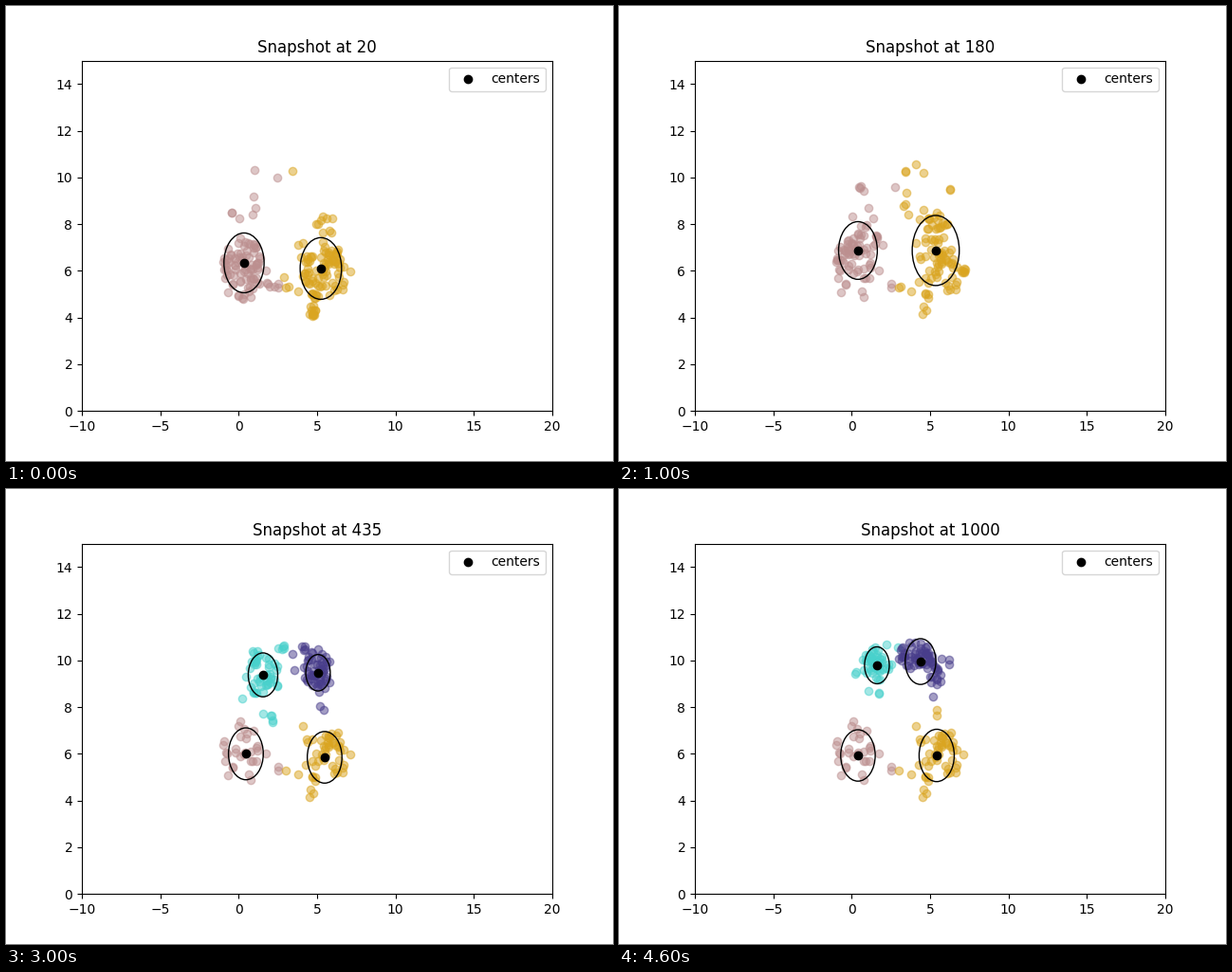
Animation, 640 px wide and 480 px high, one loop 5 s. Source, as a matplotlib script:

```python
import numpy as np
import matplotlib.pyplot as plt
from matplotlib.animation import FuncAnimation
from matplotlib.patches import Circle

ROSE, GOLD = "rosybrown", "goldenrod"
TEAL, INDIGO = "mediumturquoise", "darkslateblue"

rng = np.random.default_rng(7)


def cloud(n, x, y, rx, ry):
    """n random points in an ellipse, slightly denser in the middle."""
    a = rng.uniform(0, 2 * np.pi, n)
    r = rng.uniform(0, 1, n) ** 0.55
    return np.column_stack([x + rx * r * np.cos(a), y + ry * r * np.sin(a)])


def join(*parts):
    return np.vstack(parts)


# Lower samples, present in every snapshot
rose_low = join(cloud(30, 0.35, 6.1, 1.5, 1.4),
                [(2.52, 5.45), (2.52, 5.28)])
gold_low = join(cloud(34, 5.5, 5.9, 1.45, 1.3),
                cloud(12, 6.0, 6.4, 0.6, 0.5),
                [(4.6, 4.47), (4.75, 4.31), (4.5, 4.15), (3.0, 5.3),
                 (3.8, 5.12), (4.1, 7.2), (7.1, 5.97)])

# Samples shared by the second and third snapshots
rose_mid = join(rose_low,
                cloud(18, -0.4, 6.8, 0.7, 0.6),
                cloud(24, 0.6, 7.3, 1.1, 0.8),
                [(1.07, 8.7), (0.05, 8.33), (1.37, 8.25)])
gold_mid = join(gold_low,
                cloud(28, 5.45, 7.6, 0.85, 1.0),
                cloud(6, 7.1, 6.1, 0.2, 0.2),
                [(3.43, 10.28), (3.5, 9.35), (3.3, 8.78), (3.62, 8.4),
                 (4.58, 8.62), (6.3, 9.5), (6.3, 9.45), (3.1, 5.33)])

# Each snapshot: step, then (colour, center, radius, samples) per cluster
snapshots = [
    (20, [
        (ROSE, (0.34, 6.34), 1.28, join(
            rose_low,
            cloud(54, 0.2, 6.1, 1.3, 1.35),
            cloud(4, 2.0, 5.4, 0.3, 0.2),
            [(1.0, 10.3), (2.45, 10.0), (0.95, 9.18), (1.08, 8.7),
             (-0.45, 8.48), (-0.45, 8.48), (0.03, 8.25), (0.88, 8.4)])),
        (GOLD, (5.24, 6.10), 1.32, join(
            gold_low,
            cloud(36, 5.2, 6.2, 1.4, 1.4),
            cloud(9, 5.5, 8.0, 0.6, 0.6),
            cloud(9, 4.75, 4.25, 0.17, 0.25),
            [(3.43, 10.28), (2.9, 5.75), (3.2, 5.33), (3.8, 7.1)])),
    ]),
    (180, [
        (ROSE, (0.40, 6.87), 1.235, join(
            rose_mid,
            cloud(4, 0.6, 9.4, 0.4, 0.25),
            [(2.77, 9.58), (1.95, 7.12)])),
        (GOLD, (5.36, 6.87), 1.5, join(
            gold_mid,
            [(3.43, 10.25), (4.1, 10.56), (4.58, 10.2), (3.42, 8.86),
             (4.33, 8.2)])),
    ]),
    (218, [
        (ROSE, (0.53, 7.05), 1.435, join(
            rose_mid,
            cloud(4, 0.92, 9.25, 0.08, 0.35),
            cloud(3, 1.4, 9.9, 0.3, 0.1),
            cloud(3, 2.2, 8.85, 0.15, 0.2),
            [(2.52, 9.75), (2.65, 9.67)])),
        (GOLD, (5.32, 6.98), 1.59, join(
            gold_mid,
            cloud(4, 4.3, 10.45, 0.4, 0.15),
            cloud(3, 5.05, 9.65, 0.18, 0.05),
            [(5.9, 9.35), (6.2, 8.9)])),
    ]),
    (435, [
        (ROSE, (0.46, 6.00), 1.11, rose_low),
        (GOLD, (5.48, 5.85), 1.105, gold_low),
        (TEAL, (1.55, 9.38), 0.94, join(
            cloud(36, 1.5, 9.35, 1.15, 0.9),
            cloud(10, 1.1, 10.2, 0.45, 0.4),
            cloud(5, 2.75, 10.5, 0.3, 0.15),
            cloud(4, 2.1, 7.6, 0.1, 0.3),
            [(0.2, 8.37), (1.55, 7.7)])),
        (INDIGO, (5.06, 9.47), 0.78, join(
            cloud(54, 5.05, 9.5, 0.9, 1.0),
            cloud(4, 4.1, 10.45, 0.15, 0.25),
            [(3.43, 10.28), (3.55, 9.6), (5.2, 8.05), (5.4, 7.9)])),
    ]),
    (1000, [
        (ROSE, (0.40, 5.93), 1.1, rose_low),
        (GOLD, (5.42, 5.93), 1.12, join(gold_low, [(5.4, 7.88), (5.4, 7.65)])),
        (TEAL, (1.61, 9.79), 0.79, join(
            cloud(50, 1.6, 9.85, 0.95, 0.7),
            [(2.2, 10.7), (2.95, 10.57), (0.2, 9.43), (0.28, 9.5),
             (1.07, 8.7), (1.75, 8.6), (1.75, 8.57)])),
        (INDIGO, (4.39, 9.95), 0.98, join(
            cloud(52, 4.1, 10.15, 1.1, 0.7),
            cloud(14, 5.3, 9.35, 0.45, 0.6),
            [(5.73, 10.08), (6.22, 10.05), (6.2, 9.83), (5.2, 8.45)])),
    ]),
]

fig, ax = plt.subplots(figsize=(6.4, 4.8), dpi=100)


def draw(i):
    ax.clear()
    step, clusters = snapshots[i]
    for color, _, _, samples in clusters:
        ax.scatter(*samples.T, c=color, alpha=0.5)
    ax.scatter(*zip(*(c[1] for c in clusters)), c="black", label="centers")
    for _, center, radius, _ in clusters:
        ax.add_patch(Circle(center, radius, fill=False))
    ax.set(xlim=(-10, 20), ylim=(0, 15), title=f"Snapshot at {step}")
    ax.legend(loc="upper right")
    return []


anim = FuncAnimation(fig, draw, frames=len(snapshots), init_func=lambda: [],
                     interval=1000, repeat=True, repeat_delay=0)
plt.show()
```
